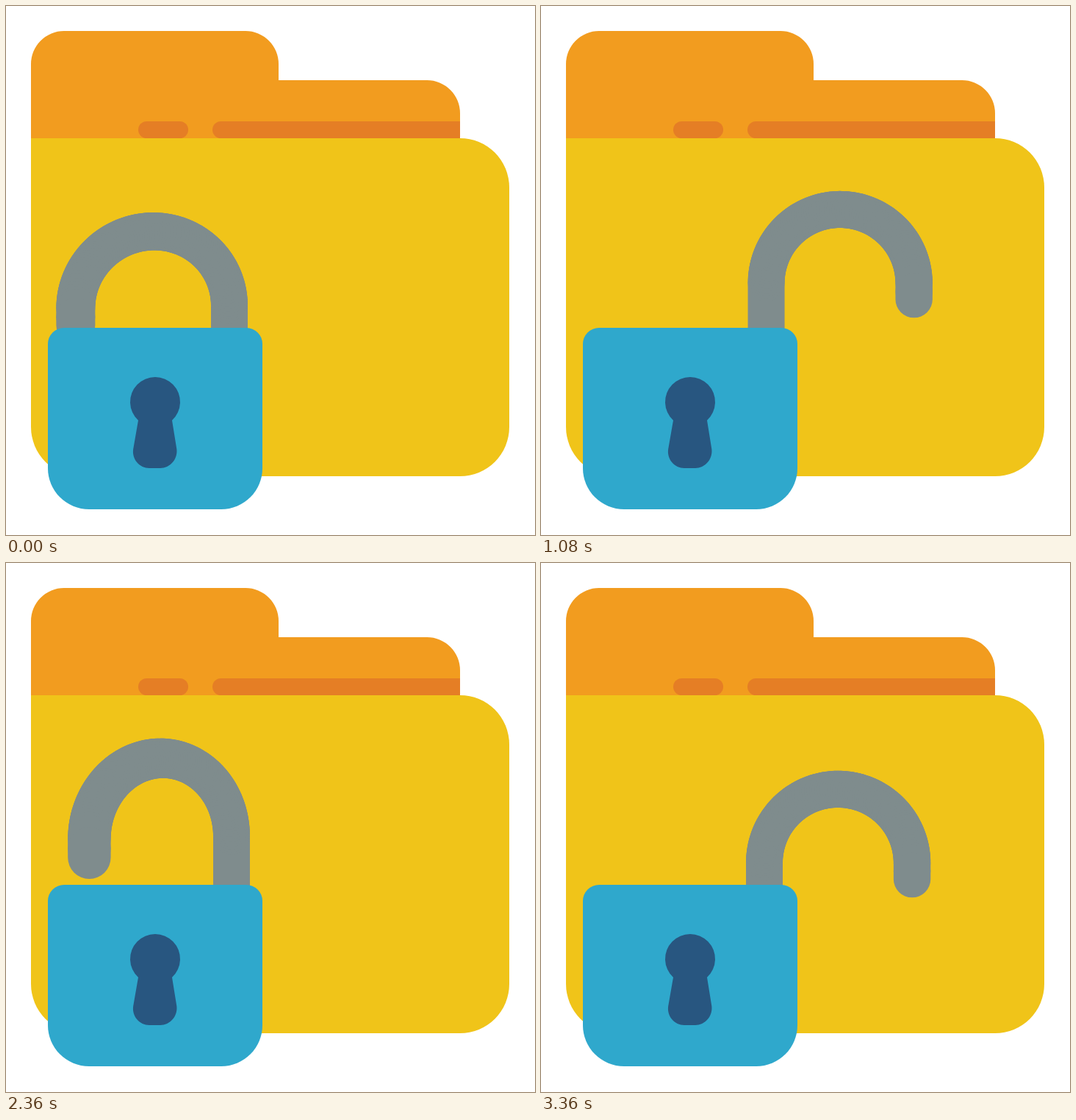
An HTML page with a canvas that plays this animation: 720 px wide and 720 px high, repeating every 4000 ms.

```html
<!DOCTYPE html>
<html lang="en">
<head>
<meta charset="utf-8">
<title>Folder unlocking</title>
<style>
  html, body { margin: 0; height: 100%; overflow: hidden; background: #fff; }
  canvas { display: block; width: 720px; height: 720px; }
</style>
</head>
<body>
<canvas id="stage" width="720" height="720"></canvas>
<script>
const ctx = document.getElementById('stage').getContext('2d');

const shape = (color, d) => ({ color, path: new Path2D(d) });
const folder = [
  shape('#f29c1f', 'M34 181V79A45 45 0 0 1 79 34H326A45 45 0 0 1 371 79V101H573A45 45 0 0 1 618 146V181Z'),
  shape('#e57e25', 'M191.5 157H236.5A11.5 11.5 0 0 1 236.5 180H191.5A11.5 11.5 0 0 1 191.5 157Z'),
  shape('#e57e25', 'M618 157H292.5A11.5 11.5 0 0 0 292.5 180H618Z'),
  shape('#f0c419', 'M34 180H618A67 67 0 0 1 685 247V573A67 67 0 0 1 618 640H101A67 67 0 0 1 34 573Z')
];
const lock = [
  shape('#2fa8cc', 'M79 438H327A22 22 0 0 1 349 460V629A56 56 0 0 1 293 685H113A56 56 0 0 1 57 629V460A22 22 0 0 1 79 438Z'),
  shape('#285680', 'M180 564A34 34 0 1 1 226 564L232.3 603C234 617 223 629 210 629H195C182 629 171 617 173.2 603Z')
];

const FRAME = 40, LOOP = 4000, CYCLE = 2000;
const REACH = 200, WIDTH = 50, DEPTH = 850;   // shackle span, tube width, camera distance
const EYE = { x: 360, y: 350 };               // vanishing point

// Smooth progress from 0 to 1 between two times
function ease(t, from, to) {
  const u = Math.min(1, Math.max(0, (t - from) / (to - from)));
  return u * u * (3 - 2 * u);
}

// Centre line of the shackle: [distance from the hinge, height]
const centreLine = [[0, 130], [0, 0]];
for (let i = 1; i <= 90; i++) {
  const a = Math.PI * i / 90;
  centreLine.push([REACH / 2 * (1 - Math.cos(a)), -REACH / 2 * Math.sin(a)]);
}
centreLine.push([REACH, 11], [REACH, 21.5]);

// A tube that turns about its hinge leg, seen in perspective
function drawShackle(t) {
  const lift = ease(t, 0, 333) - ease(t, 1000, 1333);
  const angle = (14 + 164 * ease(t, 200, 867)) * Math.PI / 180;
  const hinge = 304 + 3 * lift, top = 408 - 36 * lift;

  const points = centreLine.map(([r, h]) => {
    const s = DEPTH / (DEPTH - r * Math.sin(angle));
    return {
      x: EYE.x + (hinge - r * Math.cos(angle) - EYE.x) * s,
      y: r ? EYE.y + (top + h - EYE.y) * s : top + h,
      w: WIDTH * s
    };
  });

  ctx.strokeStyle = '#7f8c8d';
  ctx.lineCap = 'round';
  for (let i = 1; i < points.length; i++) {
    const a = points[i - 1], b = points[i];
    ctx.lineWidth = (a.w + b.w) / 2;
    ctx.beginPath();
    ctx.moveTo(a.x, a.y);
    ctx.lineTo(b.x, b.y);
    ctx.stroke();
  }
}

function fillAll(shapes) {
  for (const { color, path } of shapes) {
    ctx.fillStyle = color;
    ctx.fill(path);
  }
}

function draw(time) {
  const t = Math.floor(time % LOOP / FRAME) * FRAME;
  ctx.fillStyle = '#fff';
  ctx.fillRect(0, 0, 720, 720);
  fillAll(folder);
  drawShackle(t > CYCLE ? t - CYCLE : t);
  fillAll(lock);
}

let start;
function tick(now) {
  start ??= now;
  draw(now - start);
  requestAnimationFrame(tick);
}
draw(0);
requestAnimationFrame(tick);
</script>
</body>
</html>
```
